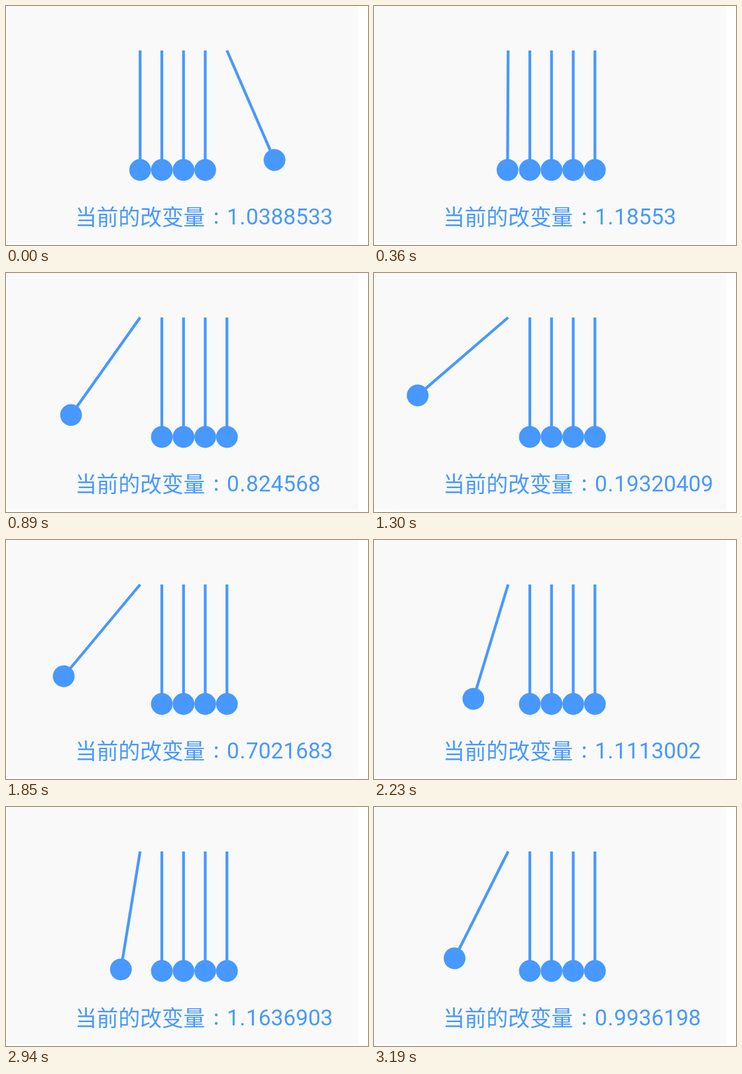
Animation of 546x360 px, one loop 3.26 s. Source, as an HTML page:

```html
<!DOCTYPE html>
<html lang="zh-CN">
<head>
<meta charset="utf-8">
<title>摆球</title>
<style>
  html, body { margin: 0; width: 100%; height: 100%; overflow: hidden; background: #fff; }
  svg { display: block; width: 546px; height: 360px; }
  .balls line { stroke: #4798ff; stroke-width: 4.2; }
  .balls circle, text { fill: #4798ff; }
  text { font: 33.3px Roboto, sans-serif; }
  .label { font: 32.7px "Noto Sans CJK SC", "Noto Sans CJK", sans-serif; }
  .colon { font-size: 31px; font-weight: 500; }
</style>
</head>
<body>
<svg viewBox="0 0 546 360">
  <rect x="1" width="530.5" height="357" fill="#f9f9f9"/>
  <g class="balls"></g>
  <text class="label" x="104.2" y="329.8">当前的改变量</text>
  <text class="colon" x="317" y="328" text-anchor="middle">:</text>
  <text id="value" x="333.1" y="328.6" dx="0 .7 .8"></text>
</svg>
<script>
const LOOP = 3260;
const COUNT = 5, PIVOT_X = 202.3, PIVOT_Y = 67, GAP = 32.73, LENGTH = 180, RADIUS = 16.4;
const SWING = 50 * Math.PI / 180, TOP_SPEED = 1.18555;

// The picture advances on a coarse clock, one step about every 1.7 ticks
const TICK = 78.6, TICKS_PER_STEP = 1.715, LAST_STEP = 24;
const startOf = step => 339 + TICK * Math.round(TICKS_PER_STEP * (step - 3));

// Phase 0 passes the middle going left, PI passes it going right
const phaseAt = speed => Math.acos(speed / TOP_SPEED);

// [step, phase]; the right swing is cut short after step 20
const keys = [
  [0, -phaseAt(1.0388533)],
  [3, phaseAt(1.18553)],
  [7, phaseAt(0.824568)],
  [10, phaseAt(0.19320409)],
  [14, phaseAt(-0.7021683)],
  [20, 2 * Math.PI - phaseAt(-1.1555779)],
  [21, 0],
  [LAST_STEP, phaseAt(0.9936198)]
];

function phaseOf(step) {
  const next = Math.max(1, keys.findIndex(([s]) => s >= step));
  const [s0, p0] = keys[next - 1], [s1, p1] = keys[next];
  return p0 + (p1 - p0) * (step - s0) / (s1 - s0);
}

const svgNS = "http://www.w3.org/2000/svg";
const group = document.querySelector(".balls");
const value = document.getElementById("value");

function add(tag, attrs, parent) {
  const el = document.createElementNS(svgNS, tag);
  for (const name in attrs) el.setAttribute(name, attrs[name]);
  return parent.appendChild(el);
}

const balls = Array.from({ length: COUNT }, (_, i) => {
  const x = PIVOT_X + i * GAP;
  const ball = add("g", {}, group);
  add("line", { x1: x, y1: PIVOT_Y, x2: x, y2: PIVOT_Y + LENGTH }, ball);
  add("circle", { cx: x, cy: PIVOT_Y + LENGTH, r: RADIUS }, ball);
  return ball;
});

function swing(i, degrees) {
  balls[i].setAttribute("transform", `rotate(${degrees} ${PIVOT_X + i * GAP} ${PIVOT_Y})`);
}

function show(step) {
  const phase = phaseOf(step);
  const angle = 2 * Math.asin(Math.sin(SWING / 2) * Math.sin(phase)) * 180 / Math.PI;
  const speed = Math.abs(TOP_SPEED * Math.cos(phase));
  swing(0, Math.max(0, angle));
  swing(COUNT - 1, Math.min(0, angle));
  value.textContent = Number(speed.toFixed(speed < 1 ? 8 : 7));
}

function draw() {
  const t = performance.now() % LOOP;
  let step = 0;
  while (step < LAST_STEP && startOf(step + 1) <= t) step++;
  show(step);
  requestAnimationFrame(draw);
}
draw();
</script>
</body>
</html>
```
